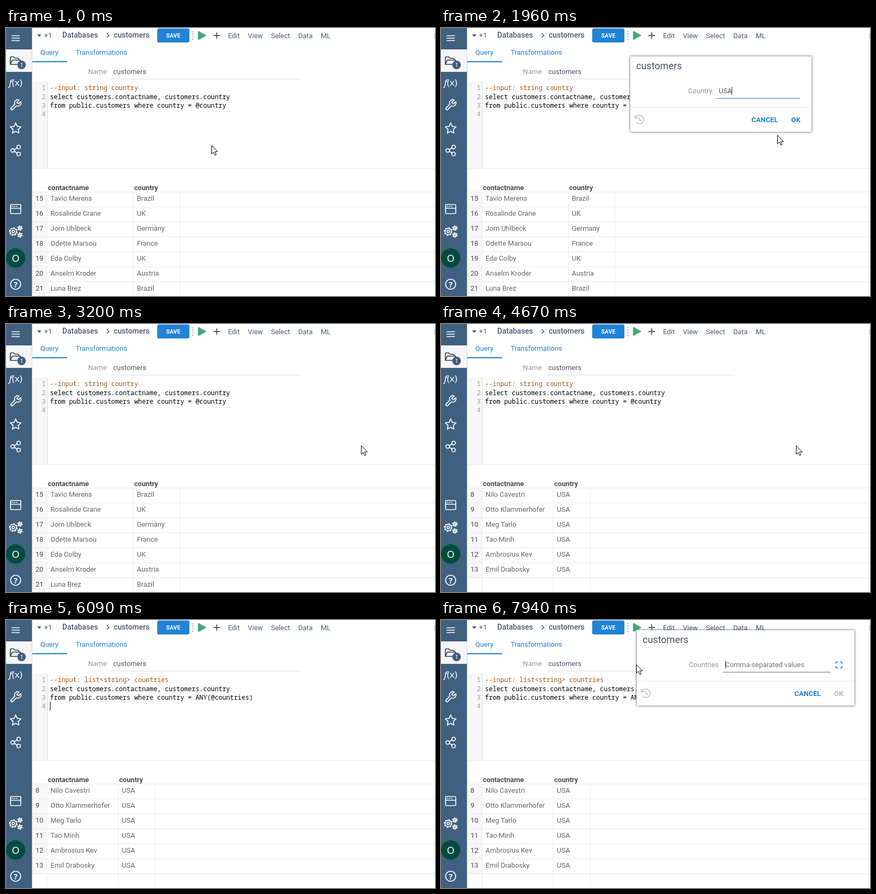
Animation, 800 px wide and 501 px high, one loop 8 s. Source, as an HTML page:

```html
<!DOCTYPE html>
<html lang="en">
<head>
<meta charset="utf-8">
<title>Query editor</title>
<style>
  html, body { margin: 0; width: 100%; height: 100%; overflow: hidden; background: #fff; }
  svg { display: block; width: 800px; height: 501px; font: 13px Roboto, Arial, sans-serif; }
  text { white-space: pre; }
  .code { font: 11.91px "Noto Sans Mono", "Liberation Mono", monospace; }
  .bold { font-weight: 700; }
  .icon { fill: none; stroke: #fff; stroke-width: 1.7; stroke-linejoin: round; stroke-linecap: round; }
</style>
</head>
<body>
<svg id="stage" viewBox="0 0 800 501" xmlns="http://www.w3.org/2000/svg"></svg>
<script>
const LOOP = 8000;
const BLUE = '#2083d5', SLATE = '#4a5878', SIDE = '#40607f', GREY = '#939393';

const text = (x, y, str, fill, extra = '') =>
  `<text x="${x}" y="${y}" fill="${fill}" ${extra}>${str.replace(/</g, '&lt;')}</text>`;
const rect = (x, y, w, h, fill, extra = '') =>
  `<rect x="${x}" y="${y}" width="${w}" height="${h}" fill="${fill}" ${extra}/>`;
const ring = (x, y, r, extra = '') => `<circle cx="${x}" cy="${y}" r="${r}" ${extra}/>`;
const path = (d, extra = '') => `<path d="${d}" ${extra}/>`;
const group = (id, body) => `<g id="${id}">${body}</g>`;

function starPath(cx, cy, outer, inner) {
  const pts = Array.from({ length: 10 }, (_, i) => {
    const r = i % 2 ? inner : outer, a = i * Math.PI / 5 - Math.PI / 2;
    return `${(cx + r * Math.cos(a)).toFixed(2)} ${(cy + r * Math.sin(a)).toFixed(2)}`;
  });
  return `M${pts.join('L')}Z`;
}

function gear(x, y, r, teeth) {
  const step = Math.PI * (r + 1) / teeth;
  return ring(x, y, r) + ring(x, y, r * 0.38) +
    ring(x, y, r + 1, `stroke-width="2.2" stroke-linecap="butt" stroke-dasharray="${step}"`);
}

function sidebar() {
  const icons =
    path('M11 14.5H25M11 19H25M11 23.5H25') +
    path('M14.7 6.3a1 1 0 0 0 0 1.4l1.6 1.6a1 1 0 0 0 1.4 0l3.77-3.77a6 6 0 0 1-7.94 7.94l-6.91 6.91a2.12 2.12 0 0 1-3-3l6.91-6.91a6 6 0 0 1 7.94-7.94l-3.76 3.76z', 'transform="translate(6 132)"') +
    path(starPath(18, 188, 10.5, 5)) +
    path('M15.5 227.5L21 224M15.5 230.5L21 234') +
    ring(12.5, 229, 3.4) + ring(23.5, 222.5, 3.4) + ring(23.5, 235.5, 3.4) +
    '<rect x="8.5" y="330" width="19" height="17" rx="1.5"/>' +
    path('M8.5 337H27.5') + path('M11.5 333.5h1M15.5 333.5h1M19.5 333.5h1') +
    gear(13.5, 380.5, 6, 8) +
    `<g stroke-width="1.3">${gear(26, 374, 3, 6)}${gear(26, 387, 3, 6)}</g>` +
    ring(18, 479, 9.5);
  const mid = 'text-anchor="middle"';
  const noto = (size, weight) => `${mid} style="font:${weight} ${size}px 'Noto Sans',sans-serif"`;
  return rect(0, 0, 48.5, 501, SIDE) + rect(0, 40, 48.5, 42, '#f4f5f6') +
    `<g class="icon">${icons}</g>` +
    path('M8 67.5V55.5Q8 54 9.5 54H14L16.5 56.5H22.5Q24 56.5 24 58V60M8 67.5L12 60H27.5L23.5 68H8Z',
      'fill="none" stroke="#2c3b4c" stroke-width="1.6" stroke-linejoin="round"') +
    ring(29, 69, 8, `fill="${SIDE}"`) + text(29, 72.5, '1', '#fff', `${mid} font-size="10"`) +
    `<text x="18" y="108" fill="#fff" ${noto(17, 500)}><tspan font-style="italic">f</tspan>(x)</text>` +
    ring(18, 430, 18, 'fill="#004d40"') + text(18, 436.5, 'O', '#fff', noto(18, 500)) +
    text(18, 484.5, '?', '#fff', noto(15, 600));
}

function topBar() {
  const menu = [['Edit', 414], ['View', 451], ['Select', 494], ['Data', 545], ['ML', 587]];
  const head = 'font-size="14" font-weight="500"';
  return path('M58 12H66L62 16.5Z', `fill="${SLATE}"`) +
    text(71, 18, '+1', SLATE) +
    text(105, 18, 'Databases', SLATE, head) +
    path('M188 10L192 14L188 18', `fill="none" stroke="${SLATE}" stroke-width="1.4"`) +
    text(201, 18, 'customers', SLATE, head) +
    rect(282, 1, 60, 26, BLUE, 'rx="3"') +
    text(312, 18, 'SAVE', '#fff', 'text-anchor="middle" class="bold" style="font-size:10.5px;letter-spacing:.2px"') +
    path('M348.5 5V24', 'stroke="#8a8f98" stroke-dasharray="3 2"') +
    rect(356, 6, 16, 17, '#ececec', 'id="hover"') +
    path('M359 7L372 14L359 21Z', 'fill="#40a97c" stroke="#40a97c" stroke-width="2" stroke-linejoin="round"') +
    path('M387 14H399M393 8V20', `stroke="${SLATE}" stroke-width="1.8"`) +
    menu.map(([s, x]) => text(x, 19, s, SLATE)).join('') +
    [10, 14, 18].map(y => rect(798, y, 2, 1.5, '#a5a9b0')).join('');
}

function form() {
  return text(64, 50, 'Query', BLUE) + text(130, 50, 'Transformations', BLUE) +
    rect(49, 62, 65, 2, BLUE) +
    text(153, 86, 'Name', GREY) + text(200, 86, 'customers', '#4d5361') +
    rect(196, 95, 352, 1, '#dcdcdc');
}

const lineY = i => [116, 133, 149, 165][i];
const code = lines => lines.map((s, i) =>
  text(82, lineY(i), s, i ? '#000' : '#9a5a10', 'class="code"')).join('');

function editor() {
  const select = 'select customers.contactname, customers.country';
  const from = 'from public.customers where country = ';
  return rect(49, 100, 28, 161, '#f7f7f7') + rect(77, 100, 1, 161, '#dddddd') +
    rect(49, 262, 751, 1, '#ececec') +
    [1, 2, 3, 4].map((n, i) => text(74, lineY(i), String(n), '#999', 'class="code" text-anchor="end"')).join('') +
    rect(82, 104, 718, 49, '#d7d4f0', 'id="selection"') +
    group('before', code(['--input: string country', select, from + '@country'])) +
    group('after', code(['--input: list<string> countries', select, from + 'ANY(@countries)'])) +
    rect(82, 153, 1, 16, '#000', 'id="caret"');
}

function table(id, first, split, end, rows) {
  let out = text(78, 303, 'contactname', '#4a4a4a', 'class="bold"') +
    text(split + 2, 303, 'country', '#4a4a4a', 'class="bold"') +
    rect(49, 306, 28, Math.min(192, 28 * rows.length), '#f7f7f7');
  for (let i = 0; i < 7; i++) out += rect(49, 306 + 28 * i, 751, 1, '#ebebeb');
  for (const x of [76, split, end]) out += rect(x, 306, 1, 192, '#ebebeb');
  rows.forEach(([name, land], i) => {
    const y = 323 + 28 * i;
    out += text(55, y, String(first + i), '#4a4a4a') + text(83, y, name, '#666') + text(split + 7, y, land, '#666');
  });
  return group(id, out);
}

function dialog(id, x, y, w, inset, label, lineFill, okFill, field) {
  return `<g id="${id}" transform="translate(${x} ${y})">` +
    rect(0, 0, w, 141, '#fff', 'rx="1" filter="url(#shadow)"') +
    text(11, 24, 'customers', '#4d5361', 'style="font-size:18px"') +
    text(153, 69, label, GREY, 'text-anchor="end"') +
    rect(161, 78, w - 161 - inset, 1, lineFill) + field +
    rect(0, 95, w, 1, '#ededed') +
    path('M-7.5-3A8 8 0 1 1-6 5.5M-8.5-8V-3H-3.5M0-4.5V.5L3.5 2.5',
      'transform="translate(17 118)" fill="none" stroke="#bcbcbc" stroke-width="1.5"') +
    text(w - 112, 123, 'CANCEL', BLUE, 'class="bold"') +
    text(w - 38, 123, 'OK', okFill, 'class="bold"') + '</g>';
}

const inputCaret = '<rect id="inputCaret" x="165" y="57" width="1" height="15" fill="#333"/>';
const expand = path('M371.5 63V59.5H375M379 59.5H382.5V63M382.5 67V70.5H379M375 70.5H371.5V67',
  `fill="none" stroke="${BLUE}" stroke-width="1.5"`);

const cursors =
  path('M0 0V16L3.7 12.6L6.2 18.3L8.6 17.3L6.2 11.7H11.3Z',
    'id="arrow" fill="#fff" stroke="#000" stroke-linejoin="round"') +
  path('M-1.5 1.5C-1.5-.4 1.5-.4 1.5 1.5V8C1.5 6.4 4.5 6.6 4.5 8.5C4.5 7.2 7.5 7.6 7.5 9.5C7.5 8.6 10 9 10 11V17L8 23.5H0L-1.5 20L-5.5 14C-6.5 12-4 11-3 12.5L-1.5 14ZM1.5 8V12M4.5 8.5V12M7.5 9.5V12',
    'id="hand" fill="#fff" stroke="#000" stroke-linejoin="round"');

const stage = document.getElementById('stage');
stage.innerHTML =
  '<defs><filter id="shadow" x="-10%" y="-20%" width="120%" height="140%">' +
  '<feDropShadow dx="0" dy="0" stdDeviation="2" flood-color="#444450"/></filter></defs>' +
  rect(0, 0, 800, 501, '#fff') + sidebar() + topBar() + form() + editor() +
  table('world', 15, 237, 324, [
    ['Tavio Merens', 'Brazil'], ['Rosalinde Crane', 'UK'], ['Jorn Uhlbeck', 'Germany'],
    ['Odette Marsou', 'France'], ['Eda Colby', 'UK'], ['Anselm Kroder', 'Austria'], ['Luna Brez', 'Brazil']
  ]) +
  table('usa', 8, 209, 278, [
    'Nilo Cavestri', 'Otto Klammerhofer', 'Meg Tarlo', 'Tao Minh', 'Ambrosius Kev', 'Emil Drabosky'
  ].map(n => [n, 'USA'])) +
  group('tip', rect(360, 40, 65, 33, '#fff', 'rx="2" filter="url(#shadow)"') + text(364, 61, 'Run query', '#4d5361')) +
  dialog('ask', 353, 53, 338, 21, 'Country', BLUE, BLUE,
    '<text id="typed" x="165" y="69" fill="#4d5361"></text>' + inputCaret) +
  dialog('askList', 365, 19, 406, 45, 'Countries', '#5f6b80', '#b9b9b9',
    text(165, 69, 'Comma-separated values', '#757575') + rect(165, 57, 1, 15, '#333') + expand) +
  group('cursor', cursors);

const el = Object.fromEntries([...stage.querySelectorAll('[id]')].map(n => [n.id, n]));
const show = (id, on) => { el[id].style.display = on ? '' : 'none'; };

// Pointer moves: start, end, from, bend, to
const moves = [
  [60, 540, [383, 219], [379, 90], [362, 12]],
  [820, 1290, [362, 12], [358, 40], [350, 65]],
  [1620, 1960, [350, 65], [500, 190], [627, 200]],
  [1960, 2320, [627, 200], [672, 200], [660, 168]],
  [2520, 3000, [660, 168], [664, 200], [662, 227]],
  [4810, 5480, [662, 227], [470, 240], [313, 211]],
  [6490, 7210, [313, 211], [345, 110], [362, 12]],
  [7600, 7940, [362, 12], [361, 50], [364, 83]]
];

function pointer(t) {
  const [start, end, a, b, c] = moves.findLast(m => t >= m[0]) || moves[0];
  const k = Math.min(1, Math.max(0, (t - start) / (end - start)));
  const u = k * k * (3 - 2 * k);
  return a.map((v, i) => (1 - u) ** 2 * v + 2 * u * (1 - u) * b[i] + u * u * c[i]);
}

function draw(t) {
  const within = (...spans) => spans.some(([a, b]) => t >= a && t < b);
  const [x, y] = pointer(t);
  const onRun = y < 24;
  const onOk = within([2300, 2560]);

  show('hover', onRun);
  show('selection', within([5500, 5960]));
  show('before', t < 5960);
  show('after', t >= 5960);
  show('caret', within([680, 820], [2700, 3200], [4150, 4670], [6030, 6490], [7000, 7550]));
  show('world', t < 3730);
  show('usa', t >= 3730);
  show('tip', within([7350, 7550]));
  show('ask', within([820, 2460]));
  show('askList', t >= 7550);

  const typed = 'USA'.slice(0, [1490, 1560, 1630].filter(s => t >= s).length);
  el.typed.textContent = typed;
  el.inputCaret.setAttribute('x', 165 + Math.floor(typed ? el.typed.getComputedTextLength() : 0));

  show('cursor', !within([1490, 1620], [5960, 6490]));
  show('hand', onRun || onOk);
  show('arrow', !(onRun || onOk));
  el.cursor.setAttribute('transform', `translate(${Math.round(x) + 0.5} ${Math.round(y) + 0.5})`);
}

function tick() {
  draw(performance.now() % LOOP);
  requestAnimationFrame(tick);
}
tick();
</script>
</body>
</html>
```
